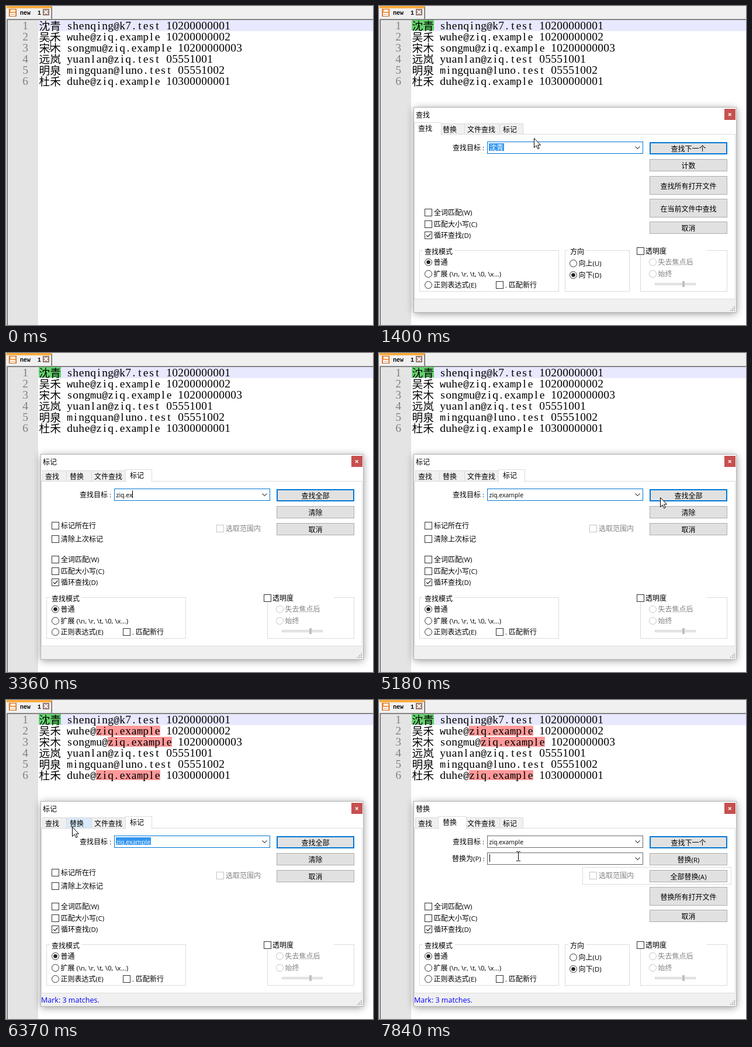
Recreate the animation shown at these times as an HTML page with a canvas. Size 628x546 px, loop 8 s.

```html
<!DOCTYPE html>
<html lang="zh">
<head>
<meta charset="utf-8">
<title>Mark and replace</title>
<style>
html, body { margin: 0; width: 100%; height: 100%; overflow: hidden; background: #fff; }
canvas { display: block; }
</style>
</head>
<body>
<canvas id="stage" width="628" height="546"></canvas>
<script>
const ctx = document.getElementById('stage').getContext('2d');
const LOOP = 8000, STEP = 70;
const CJK = '"Noto Sans CJK SC", "Noto Sans CJK", sans-serif';
const UI = '"Open Sans", "Noto Sans", sans-serif';
const BLUE = '#0078d7', GRAY = '#838383', LINE = '#dcdcdc';

const QUERY = 'ziq.example';
const ROWS = [
  ['沈青', 'shenqing@k7.test 10200000001'],
  ['吴禾', 'wuhe@ziq.example 10200000002'],
  ['宋木', 'songmu@ziq.example 10200000003'],
  ['远岚', 'yuanlan@ziq.test 05551001'],
  ['明泉', 'mingquan@luno.test 05551002'],
  ['杜禾', 'duhe@ziq.example 10300000001']
];
const TABS = [['查找', 62, 103, 67], ['替换', 103, 146, 109], ['文件查找', 146, 206, 151], ['标记', 206, 246, 212]];
const KEYS = [2590, 2660, 2800, 2940, 3150, 3360, 3430, 3570, 3780, 3990, 4060];

// Pointer path: time, x, y
const PATH = [
  [560, 76, 66], [840, 76, 35], [910, 76, 35], [1400, 265, 226], [1680, 236, 208], [1820, 236, 208],
  [2170, 240, 238], [4620, 240, 238], [4970, 398, 266], [5180, 481, 247], [5460, 487, 243], [5880, 487, 243],
  [6370, 113, 217], [6510, 96, 214], [6720, 116, 210], [7000, 117, 210], [7560, 238, 267]
];

const clamp = v => Math.max(0, Math.min(1, v));

function pointer(t) {
  const i = PATH.findIndex(p => p[0] > t);
  if (i === 0) return PATH[0].slice(1);
  if (i < 0) return PATH[PATH.length - 1].slice(1);
  const [t0, x0, y0] = PATH[i - 1], [t1, x1, y1] = PATH[i];
  const u = (t - t0) / (t1 - t0), e = u * u * (3 - 2 * u);
  return [Math.round(x0 + (x1 - x0) * e), Math.round(y0 + (y1 - y0) * e)];
}

function rect(x0, y0, x1, y1, color) {
  ctx.fillStyle = color;
  ctx.fillRect(x0, y0, x1 - x0, y1 - y0);
}

function frame(x0, y0, x1, y1, border, fill, w = 1) {
  rect(x0, y0, x1, y1, border);
  rect(x0 + w, y0 + w, x1 - w, y1 - w, fill);
}

function stroke(points, color, width = 1) {
  ctx.beginPath();
  points.forEach(([x, y]) => ctx.lineTo(x, y));
  ctx.strokeStyle = color;
  ctx.lineWidth = width;
  ctx.stroke();
}

// Interface text: Chinese runs at 12px, Latin runs at their own size; cy is the middle line
function label(text, x, cy, { color = '#000', size = 11.5, center = false } = {}) {
  const runs = text.match(/[\u4e00-\u9fff]+|[^\u4e00-\u9fff]+/g).map(s => {
    const font = s[0] >= '\u4e00' ? '12px ' + CJK : size + 'px ' + UI;
    ctx.font = font;
    return { s, font, w: ctx.measureText(s).width };
  });
  if (center) x -= runs.reduce((sum, r) => sum + r.w, 0) / 2;
  ctx.fillStyle = color;
  for (const r of runs) {
    ctx.font = r.font;
    ctx.fillText(r.s, x, Math.round(cy + 4.5));
    x += r.w;
  }
}

// Fixed-pitch serif text, one glyph per cell
function cells(text, x, y, pitch, color) {
  ctx.fillStyle = color;
  ctx.textAlign = 'center';
  [...text].forEach((c, i) => {
    ctx.font = /[mw@]/.test(c)
      ? pitch * 1.7 + 'px "Liberation Mono", monospace'
      : pitch * 1.95 + 'px "Liberation Serif", serif';
    ctx.fillText(c, x + (i + 0.5) * pitch, y);
  });
  ctx.textAlign = 'left';
}

function editor(t) {
  rect(0, 0, 628, 546, '#fff');
  rect(0, 0, 628, 22, '#f0f0f0');
  rect(0, 22, 3, 546, '#f0f0f0');
  rect(1, 0, 78, 4, '#faaa3c');
  rect(78, 1, 79, 22, '#696969');
  rect(77, 4, 78, 22, '#a0a0a0');
  rect(1, 22, 628, 23, '#a0a0a0');
  rect(1, 23, 628, 24, '#696969');
  rect(1, 22, 2, 546, '#a0a0a0');
  rect(2, 23, 3, 546, '#696969');
  rect(3, 24, 55, 546, '#e4e4e4');
  rect(55, 24, 628, 43, '#e8e8ff');

  frame(5, 5, 18, 18, '#c8641e', '#f59a4a');
  rect(8, 6, 16, 10, '#fff0dc');
  rect(7, 12, 16, 17, '#fff');
  rect(8, 14, 15, 15, '#e0a070');
  ctx.font = 'bold 10px "Liberation Mono", monospace';
  ctx.fillStyle = '#000';
  ctx.fillText('new\u00a0\u00a01', 24, 15);
  frame(63, 5, 74, 16, '#8c6a60', '#a88a80');
  stroke([[65.5, 7.5], [71.5, 13.5]], '#fff', 2);
  stroke([[71.5, 7.5], [65.5, 13.5]], '#fff', 2);

  if (t >= 840) rect(56, 24, 94, 42, '#66d36e');
  ROWS.forEach(([name, rest], i) => {
    const y = 40 + i * 19, at = rest.indexOf(QUERY);
    if (t >= 5670 && at >= 0) rect(104 + at * 10, y - 15, 104 + (at + QUERY.length) * 10, y + 2, '#ff9999');
    cells(String(i + 1), 28, y, 10, '#808080');
    ctx.font = '300 18.7px ' + CJK;
    ctx.fillStyle = '#000';
    ctx.fillText(name, 56.5, y + 0.5);
    cells(rest, 104, y, 10, '#000');
  });
  if (t >= 280 && t < 840) rect(56, 24, 58, 43, '#000');
}

function button(text, y0, y1, { primary, fill = '#e1e1e1' } = {}) {
  frame(463, y0, 596, y1, primary ? BLUE : '#adadad', fill, primary ? 2 : 1);
  label(text, 529.5, (y0 + y1) / 2 + 1, { center: true });
}

function check(text, x, cy, { on, off, gap = 16 } = {}) {
  const y = Math.round(cy - 6.5);
  frame(x, y, x + 13, y + 13, off ? '#c4c4c4' : '#333', '#fff');
  if (on) stroke([[x + 3, y + 6.5], [x + 5.5, y + 9], [x + 10.5, y + 3.5]], '#222', 1.2);
  label(text, x + gap, cy, { color: off ? GRAY : '#000' });
}

function radio(text, cx, cy, { on, off } = {}) {
  ctx.beginPath();
  ctx.arc(cx, cy, 6, 0, 7);
  ctx.strokeStyle = off ? '#c4c4c4' : '#333';
  ctx.lineWidth = 1;
  ctx.stroke();
  if (on) {
    ctx.beginPath();
    ctx.arc(cx, cy, 3.3, 0, 7);
    ctx.fillStyle = '#222';
    ctx.fill();
  }
  label(text, cx + 9, cy, { color: off ? GRAY : '#000' });
}

function group(x0, y0, x1, y1, gap0, gap1) {
  frame(x0, y0, x1, y1, LINE, '#fff');
  rect(gap0, y0, gap1, y0 + 1, '#fff');
}

function combo(y, border) {
  frame(185, y, 452, y + 21, border, '#fff');
  stroke([[438.5, y + 8.5], [442.5, y + 12.5], [446.5, y + 8.5]], '#555', 1.2);
}

function target(t) {
  const focus = t < 7700;
  const first = t < 2590;
  const selected = first || (t >= 5670 && focus);
  const text = first ? ROWS[0][0] : QUERY.slice(0, KEYS.filter(k => k <= t).length);
  combo(232, focus ? BLUE : '#6a6a6a');
  ctx.font = '10.5px ' + UI;
  const w = first ? 25 : ctx.measureText(text).width;
  if (selected) rect(188, 235, Math.round(189 + w), 248, '#3296f0');
  label(text, first ? 189 : 188.5, 242, { size: 10.5, color: selected ? '#fff' : '#000' });
  if (t >= 2450 && t < 4550) rect(Math.round(188.5 + w), 235, Math.round(189.5 + w), 248, '#000');
}

function pageItems(page, t) {
  // The hover look follows the pointer with a short delay
  const [hx, hy] = pointer(t - 140);
  const hover = hx >= 463 && hx < 596 && hy >= 233 && hy < 254;
  const fill = t >= 5530 && t < 5670 ? '#cce4f7' : hover ? '#e5f1fb' : '#e1e1e1';
  if (page === 0) {
    button('查找下一个', 233, 254, { primary: true, fill });
    button('计数', 262, 283);
    button('查找所有打开文件', 291, 323);
    button('在当前文件中查找', 330, 362);
    button('取消', 369, 390);
  }
  if (page === 1) {
    group(348, 286, 603, 316, 0, 0);
    label('替换为(P) :', 125, 271);
    combo(261, '#6a6a6a');
    if (t >= 7700) rect(189, 264, 190, 277, '#000');
    button('查找下一个', 233, 254, { primary: true, fill });
    button('替换(R)', 262, 283);
    button('全部替换(A)', 291, 312);
    button('替换所有打开文件', 320, 352);
    button('取消', 359, 380);
  }
  if (page === 3) {
    button('查找全部', 233, 254, { primary: true, fill });
    button('清除', 262, 283);
    button('取消', 291, 312);
    check('标记所在行', 78, 295.5);
    check('清除上次标记', 78, 318.5);
  }
  if (page === 1 || page === 3) check('选取范围内', 360, 300.5, { off: true });
  if (page === 0 || page === 1) {
    group(318, 418, 429, 489, 324, 354);
    label('方向', 327, 420);
    radio('向上(U)', 332.5, 440.5);
    radio('向下(D)', 332.5, 460.5, { on: true });
  }
}

function dialog(t, mx, my) {
  const tab = t < 1680 ? 0 : t < 7000 ? 3 : 1;
  const title = t < 1750 ? 0 : t < 7070 ? 3 : 1;
  const page = tab === title ? tab : -1;

  ctx.save();
  ctx.globalAlpha = clamp((t - 980) / 210);
  ctx.save();
  ctx.shadowColor = 'rgba(0,0,0,.45)';
  ctx.shadowBlur = 13;
  ctx.shadowOffsetY = 2;
  rect(60, 174, 611, 524, '#fff');
  ctx.restore();
  frame(59, 173, 612, 525, '#b4b4b4', '#fff');
  rect(60, 502, 611, 524, '#f0f0f0');
  label(TABS[title][0], 63, 186);
  rect(591, 176, 610, 195, '#c75050');
  stroke([[598, 183.5], [602.5, 188]], '#fff', 1.4);
  stroke([[602.5, 183.5], [598, 188]], '#fff', 1.4);

  frame(60, 219, 610, 502, LINE, '#fff');
  TABS.forEach(([, x0, x1], i) => {
    const over = mx >= x0 && mx < x1 && my >= 201 && my < 219;
    if (i !== tab) frame(x0, 201, x1 + 1, 220, '#d9d9d9', over ? '#d8eaf9' : '#f0f0f0');
  });
  const [, a, b] = TABS[tab];
  frame(a - 2, 199, b + 4, 221, LINE, '#fff');
  rect(a - 1, 219, b + 3, 222, '#fff');
  TABS.forEach(([text, , , x], i) => label(text, x, i === tab ? 209 : 211));

  label('查找目标 :', 126, 242);
  target(t);
  pageItems(page, t);

  check('全词匹配(W)', 78, 353.5);
  check('匹配大小写(C)', 78, 373.5);
  check('循环查找(D)', 78, 392.5, { on: true });
  group(69, 418, 308, 489, 75, 129);
  label('查找模式', 78, 420);
  radio('普通', 84.5, 438.5, { on: true });
  radio('扩展 (\\n, \\r, \\t, \\0, \\x...)', 84.5, 458.5);
  radio('正则表达式(E)', 84.5, 477.5);
  check('. 匹配新行', 200, 477.5);
  group(447, 418, 596, 489, 447, 561);
  check('透明度', 441, 419.5, { gap: 15 });
  radio('失去焦点后', 468.5, 438.5, { off: true });
  radio('始终', 468.5, 458.5, { off: true });
  frame(472, 474, 542, 478, '#d6d6d6', '#e7eaea');
  rect(519, 471, 523, 481, '#bfbfbf');

  if (t >= 5670) label('Mark: 3 matches.', 60, 513, { size: 12.5, color: '#0000ff' });
  for (let i = 0; i < 3; i++)
    for (let j = 0; j <= i; j++) rect(607 - j * 3, 514 + i * 3, 609 - j * 3, 516 + i * 3, '#b8b8b8');
  ctx.restore();
}

function arrow(x, y) {
  ctx.save();
  ctx.translate(x + 0.5, y + 0.5);
  ctx.beginPath();
  [[0, 0], [0, 16], [3.7, 12.5], [6.3, 18], [8.7, 17], [6.2, 11.5], [11, 11.5]].forEach(p => ctx.lineTo(...p));
  ctx.closePath();
  ctx.fillStyle = '#fff';
  ctx.fill();
  ctx.strokeStyle = '#000';
  ctx.lineWidth = 1;
  ctx.stroke();
  ctx.restore();
}

function beam(x, y) {
  rect(x, y - 7, x + 1, y + 8, '#000');
  for (const row of [y - 8, y + 8]) {
    rect(x - 3, row, x, row + 1, '#000');
    rect(x + 1, row, x + 4, row + 1, '#000');
  }
}

function draw(t) {
  const [x, y] = pointer(t);
  const shown = t >= 1050;
  editor(t);
  if (shown) dialog(t, x, y);
  if (t >= 2590 && t < 4480) return;
  const inDialog = shown && x >= 60 && x < 611 && y >= 174 && y < 524;
  const inField = inDialog && x > 187 && x < 435 &&
    ((y > 232 && y < 253) || (t >= 7070 && y > 261 && y < 282));
  if (inField || (!inDialog && x > 55)) beam(x, y);
  else arrow(x, y);
}

const start = performance.now();
function tick() {
  const t = Math.max(0, performance.now() - start) % LOOP;
  draw(Math.floor(t / STEP + 1e-6) * STEP);
  requestAnimationFrame(tick);
}
tick();
</script>
</body>
</html>
```
